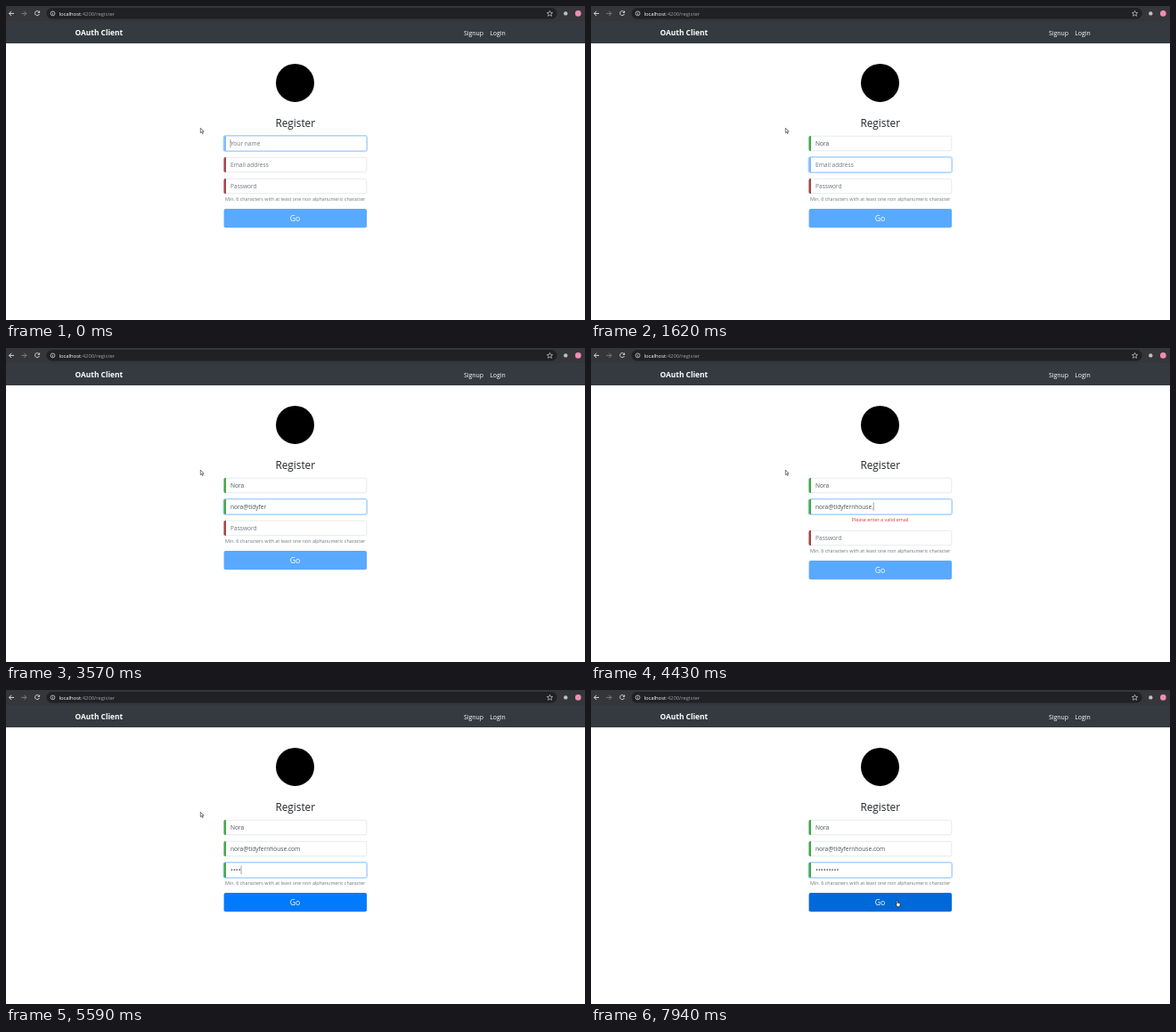
An HTML page that plays this animation: 650 px wide and 353 px high, repeating every 8000 ms.

```html
<!DOCTYPE html>
<html lang="en">
<head>
<meta charset="utf-8">
<title>Register</title>
<style>
  html, body { margin: 0; width: 100%; height: 100%; overflow: hidden; background: #fff; }
  svg { display: block; width: 650px; height: 353px; }
  text { font: 6.6px "Open Sans", "Noto Sans", sans-serif; fill: #495057; white-space: pre; }
  .mid { text-anchor: middle; }
  .hint { font-size: 5.37px; fill: #6c757d; }
  .nav { font-size: 6.9px; fill: #fff; }
  .icon { fill: none; stroke: #e8eaed; stroke-width: .9; }
</style>
</head>
<body>
<svg viewBox="0 0 650 353">
  <!-- browser bar -->
  <rect width="650" height="17" fill="#35363a"/>
  <rect x="45.5" y="2" width="573" height="12.6" rx="6.3" fill="#202124"/>
  <g class="icon">
    <path d="M9 8.4H3.6M6.1 5.8 3.5 8.4 6.1 11"/>
    <path d="M17.4 8.4h5.4M20.3 5.8l2.6 2.6-2.6 2.6" stroke="#84868a"/>
    <path d="M37.2 6.8A2.5 2.5 0 1 0 37.4 9M37.6 5.6V7.4H35.8"/>
    <circle cx="52.5" cy="8.4" r="2.4" stroke-width=".7"/>
    <path d="M52.5 8v1.8M52.5 6.8v.6" stroke-width=".7"/>
    <path d="M610.5 5.4l.9 2 2.2.2-1.6 1.5.5 2.2-2-1.2-2 1.2.5-2.2-1.6-1.5 2.2-.2z" stroke-width=".6"/>
  </g>
  <text x="59.4" y="10.7" style="font-size:5.9px;fill:#9aa0a6"><tspan fill="#fff">localhost</tspan>:4200/register</text>
  <circle cx="628.3" cy="8.4" r="2.2" fill="#bdc1c6"/>
  <circle cx="642.3" cy="8.4" r="3.3" fill="#f28cb1"/>

  <!-- site header -->
  <rect y="17" width="650" height="25" fill="#343a40"/>
  <text x="77.5" y="33" style="font-size:8.4px;font-weight:700;fill:#fff">OAuth Client</text>
  <text class="nav" x="514" y="32.6">Signup</text>
  <text class="nav" x="543.3" y="32.6">Login</text>

  <circle cx="324.5" cy="86.4" r="21.5"/>
  <text class="mid" x="324.7" y="136" style="font-size:11.8px;fill:#212529">Register</text>

  <g id="fields"></g>
  <text id="error" class="mid" x="324.5" y="195.1" style="font-size:5.4px;fill:#dc3545">Please enter a valid email</text>
  <g id="lower">
    <text class="hint" x="246" y="218.7">Min. 6 characters with at least one non alphanumeric character</text>
    <rect id="button" x="244.6" y="228" width="160.4" height="21.2" rx="2"/>
    <text class="mid" x="324.5" y="242.1" style="font-size:8.7px;fill:#fff">Go</text>
  </g>
  <path id="arrow" d="M0 0V5.4L1.3 4.3 2.2 6.4 3 6 2.1 4H3.8Z" fill="#fff" stroke="#000" stroke-width=".5"/>
  <path id="hand" transform="translate(342 236)" fill="#fff" stroke="#000" stroke-width=".6"
    d="M1.7.4q.7 0 .7.8v2.1l2.2.5q.6.2.5 1l-.5 2.9H1.9L.3 5q0-.7.8-.2V1.2q0-.8.6-.8z"/>
</svg>
<script>
const LOOP = 8000, SHIFT = 11;
const $ = id => document.getElementById(id);
const show = (node, on) => node.style.display = on ? "" : "none";
const mix = (a, b, p) => `color-mix(in srgb, ${b} ${p * 100}%, ${a})`;
const within = (t, a, b) => t >= a && t < b;
const ramp = (t, start, length = 150) => {
  const p = Math.min(1, Math.max(0, (t - start) / length));
  return p * p * (3 - 2 * p);
};

function makeField(y, hint, value, keys, fontSize = 6.6) {
  const g = document.createElementNS("http://www.w3.org/2000/svg", "g");
  g.innerHTML = `
    <rect x="-.5" y="-.5" width="161.5" height="18" rx="2.2" fill="none" stroke="#007bff"/>
    <rect x=".25" y=".25" width="160" height="16.5" rx="1.7" fill="#fff" stroke-width=".5"/>
    <path d="M2.5 0H1.8Q0 0 0 1.8V15.2Q0 17 1.8 17H2.5Z"/>
    <text x="7.5" y="11.2"></text>
    <path d="M0 3.6V13.2" stroke="#444" stroke-width=".5"/>`;
  $("fields").append(g);
  const [ring, box, bar, text, caret] = g.children;
  return (t, focus, valid, caretOn, dy = 0) => {
    const typed = value.slice(0, keys.filter(k => k <= t).length);
    g.setAttribute("transform", `translate(244.5 ${y + dy})`);
    ring.style.strokeOpacity = focus * .3;
    box.style.stroke = mix("#ced4da", "#80bdff", focus);
    bar.style.fill = mix(mix("#a94442", "#80bdff", focus), "#42a948", valid);
    text.textContent = typed || hint;
    text.style.fill = typed ? "#495057" : "#6c757d";
    text.style.fontSize = (typed ? fontSize : 6.6) + "px";
    show(caret, caretOn);
    const end = typed ? text.getComputedTextLength() + .3 : 0;
    caret.setAttribute("transform", `translate(${7.5 + end} 0)`);
  };
}

const nameField = makeField(146, "Your name", "Nora", [470, 690, 840, 1230]);
const emailField = makeField(170, "Email address", "nora@tidyfernhouse.com", [
  2020, 2110, 2180, 2260, 2490, 2870, 2960, 3100, 3250, 3340, 3500,
  3570, 3730, 3800, 4020, 4100, 4170, 4250, 4430, 4510, 4590, 4740]);
const passField = makeField(194, "Password", "•".repeat(9),
  [5210, 5360, 5440, 5590, 6050, 6130, 6280, 6510, 6760], 7.8);

function draw(t) {
  const toEmail = ramp(t, 1440), toPass = ramp(t, 4870);
  const invalid = within(t, 2020, 2870) || within(t, 4430, 4510);
  const dy = invalid ? SHIFT : 0;
  // a trailing dot makes the address briefly invalid again
  const emailValid = ramp(t, 2850) - ramp(t, 4430) + ramp(t, 4510);

  nameField(t, 1 - toEmail, ramp(t, 450), t < 1230);
  emailField(t, toEmail - toPass, emailValid, within(t, 2100, 3570) || within(t, 3730, 4660));
  passField(t, toPass, ramp(t, 5190), within(t, 5210, 6280), dy);

  show($("error"), invalid);
  $("lower").setAttribute("transform", `translate(0 ${dy})`);
  $("button").style.fill = t < 5210 ? "#59a9ff" : mix("#007bff", "#0069d9", ramp(t, 7740, 190));

  const [x, y] = t < 7460 ? [218.3, 137.2] : t < 7540 ? [275, 184] : [330.5, 216.5];
  $("arrow").setAttribute("transform", `translate(${x} ${y})`);
  show($("arrow"), t < 7780);
  show($("hand"), t >= 7780);
}

const start = performance.now();
function tick() {
  draw((performance.now() - start) % LOOP);
  requestAnimationFrame(tick);
}
tick();
</script>
</body>
</html>
```
